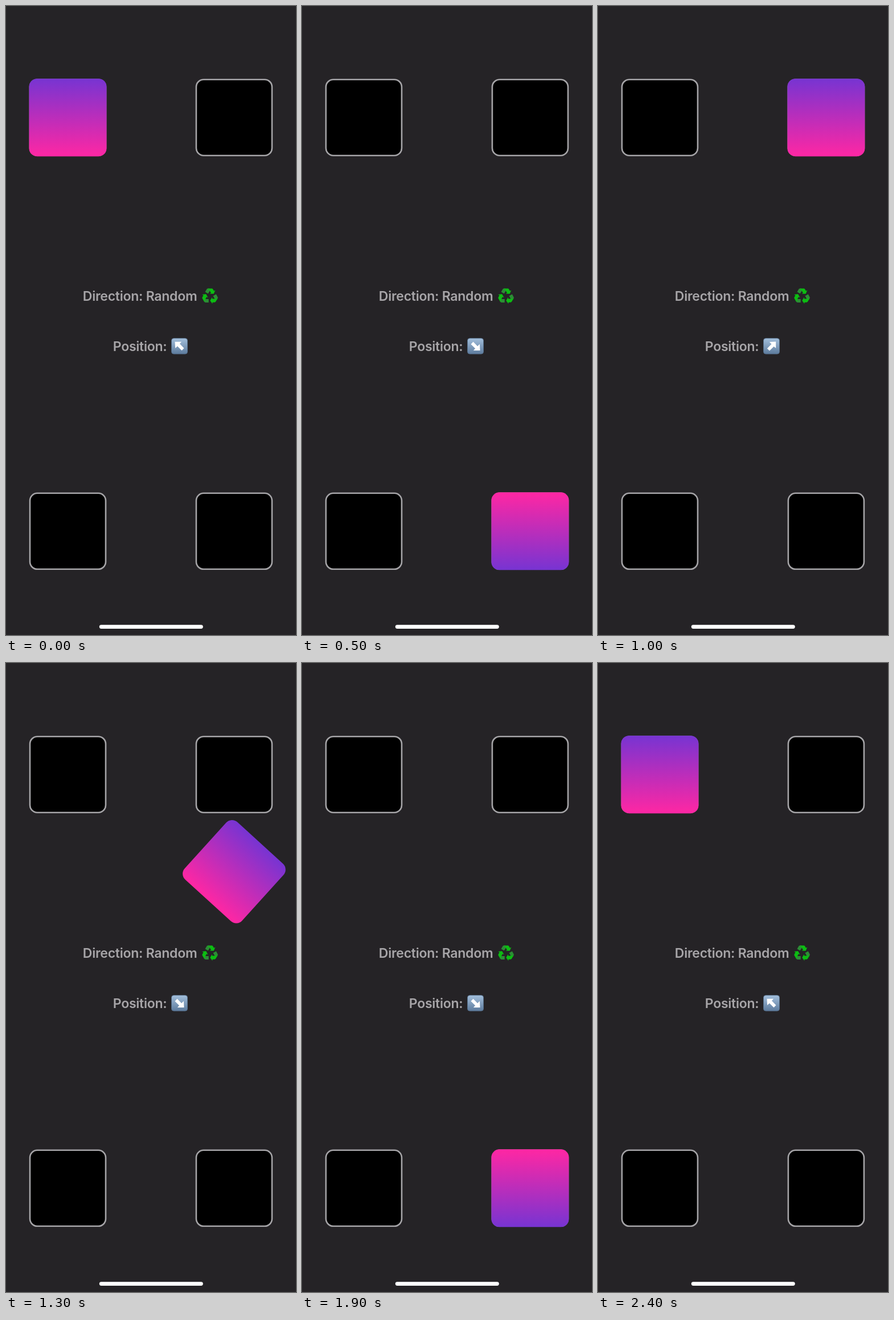
An HTML page for the animation above (2700 ms loop, 509 px wide and 1101 px high).

```html
<!DOCTYPE html>
<html lang="en">
<head>
<meta charset="utf-8">
<title>Corner tiles</title>
<style>
  html, body { margin: 0; width: 100%; height: 100%; overflow: hidden; background: #252326; }
  svg { display: block; width: 509px; height: 1101px; }
  text { font: 600 23px Inter, "Liberation Sans", sans-serif; letter-spacing: -.25px; fill: #a7a5a8; }
  .slot { fill: #000; stroke: #a5a4a7; stroke-width: 2.6; }
</style>
</head>
<body>
<svg viewBox="0 0 509 1101">
  <defs>
    <linearGradient id="tileFill" x2="0" y2="1">
      <stop stop-color="#7734d2"/><stop offset="1" stop-color="#ff27a3"/>
    </linearGradient>
    <linearGradient id="keyFill" x2="0" y2="1">
      <stop stop-color="#a3bfdc"/><stop offset="1" stop-color="#5d7b9d"/>
    </linearGradient>
    <g id="arm">
      <path fill="#2c8d35" d="M-4-15Q-5.4-15-6.2-13.8L-9.4-8.4-3.6-5 .4-11.6-1.6-15Z"/>
      <path fill="#0cbc12" d="M-4-15H3.6Q5-15 5.8-13.6L7.8-10.2 10.4-11.6 7.4-4.6H-.4L2.2-6.4Q-1-12-4-15Z"/>
    </g>
    <rect id="slot" class="slot" x="-66.5" y="-66.5" width="133" height="133" rx="13"/>
  </defs>

  <use href="#slot" x="108.5" y="195.2"/>
  <use href="#slot" x="400.4" y="195.2"/>
  <use href="#slot" x="108.5" y="919.3"/>
  <use href="#slot" x="400.4" y="919.3"/>

  <text x="134.8" y="515.5">Direction: Random</text>
  <g transform="translate(358 508) scale(.9)">
    <use href="#arm"/>
    <use href="#arm" transform="rotate(120)"/>
    <use href="#arm" transform="rotate(240)"/>
  </g>

  <text x="187.8" y="603.5">Position:</text>
  <g transform="translate(304.5 595.4)">
    <rect x="-14" y="-13.7" width="28" height="27.4" rx="4" fill="url(#keyFill)" stroke="#56718f" stroke-width=".8"/>
    <path id="arrow" fill="#fff" d="M-8-7.7H3.6L.5-4.2 8 3.5 4 7.6-3.6 0-7.4 3.6Z"/>
  </g>

  <rect x="163.8" y="1083.2" width="182" height="6.8" rx="3.4" fill="#fff"/>
  <rect id="tile" x="-68" y="-68" width="136" height="136" rx="14" fill="url(#tileFill)"/>
</svg>
<script>
  const LOOP = 2700, TICK = 100, MOVE = 310;
  const corners = {
    topLeft: { x: 108.5, y: 195.2, arrow: 0 },
    topRight: { x: 400.4, y: 195.2, arrow: 90 },
    bottomRight: { x: 400.4, y: 919.3, arrow: 180 }
  };
  const moves = [
    { at: 113, to: corners.bottomRight },
    { at: 616, to: corners.topRight },
    { at: 1196, to: corners.bottomRight },
    { at: 2004, to: corners.topLeft }
  ];
  const tile = document.getElementById("tile");
  const arrow = document.getElementById("arrow");

  // Ease-in-out: cubic bezier (.42, 0, .58, 1), solved by bisection.
  function ease(x) {
    if (x >= 1) return 1;
    let lo = 0, hi = 1, s = .5;
    for (let i = 0; i < 24; i++) {
      s = (lo + hi) / 2;
      const bx = 1.26 * s * (1 - s) ** 2 + 1.74 * s * s * (1 - s) + s ** 3;
      if (bx < x) lo = s; else hi = s;
    }
    return s * s * (3 - 2 * s);
  }

  function draw(time) {
    let { x, y, arrow: heading } = corners.topLeft;
    let turn = 0;
    for (const { at, to } of moves) {
      if (time < at) break;
      const p = ease((time - at) / MOVE);
      x += (to.x - x) * p;
      y += (to.y - y) * p;
      turn += 180 * p;
      heading = to.arrow;
    }
    tile.setAttribute("transform", `translate(${x} ${y}) rotate(${turn})`);
    arrow.setAttribute("transform", `rotate(${heading})`);
  }

  const start = performance.now();
  function loop() {
    const time = (performance.now() - start) % LOOP;
    draw(Math.floor(time / TICK) * TICK);
    requestAnimationFrame(loop);
  }
  draw(0);
  requestAnimationFrame(loop);
</script>
</body>
</html>
```
